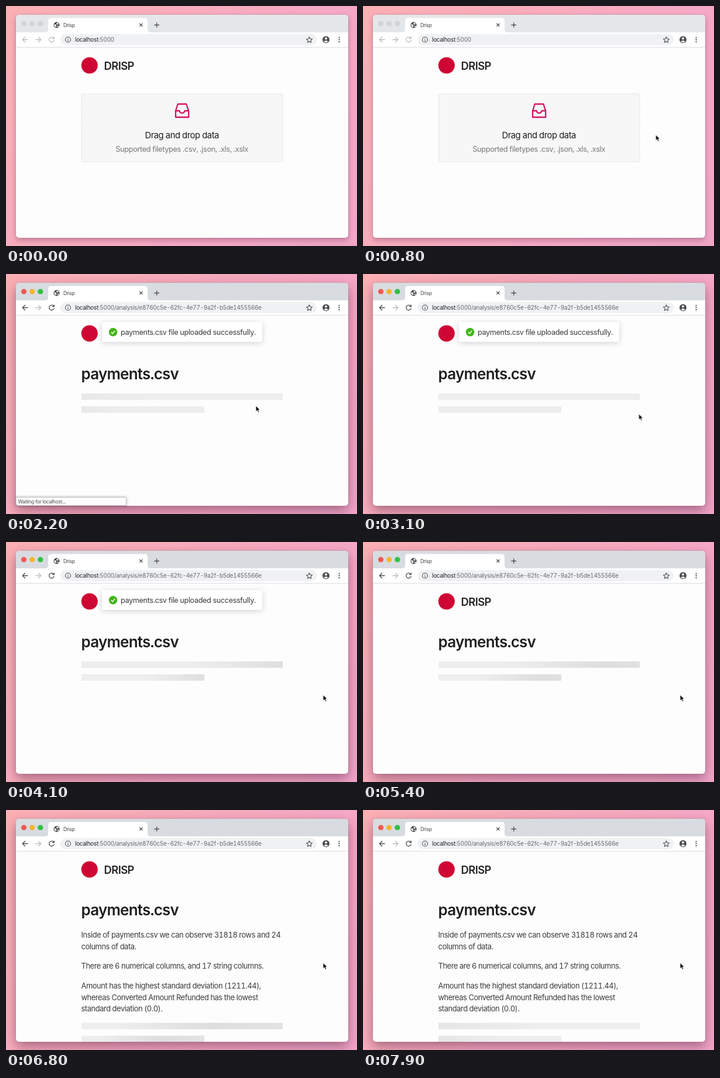
An HTML page for the animation above (8000 ms loop, 600x410 px).

```html
<!DOCTYPE html>
<html lang="en">
<head>
<meta charset="utf-8">
<title>Upload demo</title>
<style>
  html, body { margin: 0; width: 100%; height: 100%; overflow: hidden; }
  body { position: relative; background: linear-gradient(125deg, #fbb0b4, #f6a9c3 60%, #f1a6c8); }
  svg { position: absolute; left: 0; top: 0; width: 600px; height: 410px; display: block; }
  text { font-family: Inter, "Open Sans", sans-serif; font-variant-numeric: tabular-nums; letter-spacing: -.03em; fill: #3a3b3f; }

  .frame { position: absolute; left: 17px; top: 15px; width: 568px; height: 380.5px; border-radius: 5px; background: #fefdfe; }
  .soft { box-shadow: 0 4px 10px rgba(70, 20, 50, .3), 0 0 1px rgba(0, 0, 0, .45); }
  .deep { box-shadow: 0 8px 20px rgba(70, 20, 50, .45), 0 0 1px rgba(0, 0, 0, .5); }

  .line { fill: none; stroke-width: 1.3; stroke-linecap: round; stroke-linejoin: round; }
  .dark { stroke: #4b4e52; }
  .pale { stroke: #b9bcc0; }
  .url { font-size: 9.9px; letter-spacing: -.025em; fill: #66696e; }
  .host { fill: #202124; }
  .tab { font-size: 8.4px; fill: #3a3d41; }
  .brand { font-size: 18.4px; font-weight: 600; fill: #232326; }
  .lead { font-size: 14.8px; fill: #1c1c1e; text-anchor: middle; }
  .hint { font-size: 12.8px; fill: #77777a; text-anchor: middle; }
  .body { font-size: 12.9px; letter-spacing: -.034em; }
  .note { font-size: 12.7px; }
  .title { font-size: 26px; font-weight: 600; fill: #1f1f22; }
  .status { font-size: 8.4px; fill: #4c4c4e; }

  /* one 8 s timeline, 1% = 80 ms */
  .idle, .active, .home, .queue, .report, .wait, .facts, .bars {
    animation: 8s step-end infinite;
  }
  .idle { animation-name: idle; }
  .active { animation-name: active; }
  .home { animation-name: home; }
  .queue { animation-name: queue; }
  .report { animation-name: report; }
  .wait { animation-name: wait; }
  .facts { animation-name: facts; }
  .bars { animation-name: bars; }
  @keyframes idle { 0% { visibility: visible } 14.375%, 100% { visibility: hidden } }
  @keyframes active { 0% { visibility: hidden } 14.375%, 100% { visibility: visible } }
  @keyframes home { 0% { visibility: visible } 24.125%, 100% { visibility: hidden } }
  @keyframes queue { 0% { visibility: hidden } 15% { visibility: visible } 24.125%, 100% { visibility: hidden } }
  @keyframes report { 0% { visibility: hidden } 24.125%, 100% { visibility: visible } }
  @keyframes wait { 0% { visibility: hidden } 25% { visibility: visible } 31.25%, 100% { visibility: hidden } }
  @keyframes facts { 0% { visibility: hidden } 77.5%, 100% { visibility: visible } }
  @keyframes bars { 0% { transform: none } 77.5%, 100% { transform: translateY(159.5px) } }

  .spin { transform-origin: 138px 284px; animation: spin 1s linear infinite; }
  @keyframes spin { from { transform: rotate(-90deg) } to { transform: rotate(270deg) } }

  .fill { transform-origin: 151px 295px; animation: fill 8s linear infinite; }
  @keyframes fill {
    0%, 15% { transform: scaleX(0) }
    18.75% { transform: scaleX(.43) }
    23.5%, 100% { transform: scaleX(1) }
  }

  .toast { filter: drop-shadow(0 2px 5px rgba(0, 0, 0, .17)); animation: toast 8s ease-out infinite; }
  @keyframes toast {
    0%, 24.5% { opacity: 0; transform: translateY(-34px) }
    27%, 62% { opacity: 1; transform: none }
    65%, 100% { opacity: 0; transform: translateY(-34px) }
  }

  .page { position: absolute; left: 17px; top: 71px; width: 568px; height: 324.5px; overflow: hidden; border-radius: 0 0 5px 5px; }
  .bar {
    position: absolute; left: 112px; height: 11px;
    background: linear-gradient(90deg, #eee 25%, #dedede 37%, #eee 63%) 100% 50% / 400% 100%;
    animation: shimmer 8s ease infinite;
  }
  .long { top: 132.5px; width: 344px; }
  .short { top: 155px; width: 210px; }
  /* 1.4 s sweeps, restarted when the text arrives; the last one is cut by the loop */
  @keyframes shimmer {
    0%, 24.125% { background-position: 100% 50% }
    41.62%, 59.12%, 76.62%, 94.995% { background-position: 0 50% }
    41.625%, 59.125%, 76.625%, 77.5% { background-position: 100% 50% }
    95% { background-position: 100% 50%; animation-timing-function: cubic-bezier(.405, .096, .623, .545) }
    100% { background-position: 51.5% 50% }
  }

  .pointer { animation: move 8s ease-in-out infinite, enter 8s step-end infinite; }
  @keyframes move {
    0%, 6.25% { transform: translate(584px, 214px) }
    13.5%, 34% { transform: translate(427px, 225px) }
    45%, 100% { transform: translate(542px, 261px) }
  }
  @keyframes enter { 0% { visibility: hidden } 6.25%, 100% { visibility: visible } }
</style>
</head>
<body>
<div class="frame soft idle"></div>
<div class="frame deep active"></div>

<svg viewBox="0 0 600 410">
  <defs>
    <path id="strip" d="M17 45V20a5 5 0 0 1 5-5H580a5 5 0 0 1 5 5V45z"/>
    <path id="back" d="M37 57.5H28.5M32.5 53.3L28.3 57.5L32.5 61.7"/>
    <path id="reload" d="M81.6 55A4.3 4.3 0 1 0 82.2 58.6M82.3 52.8V55.7H79.3"/>
  </defs>

  <!-- tab strip -->
  <g class="idle">
    <use href="#strip" fill="#e4e7ea"/>
    <g fill="#d2d4d7"><circle cx="30.5" cy="30" r="4.6"/><circle cx="44.7" cy="30" r="4.6"/><circle cx="58.8" cy="30" r="4.6"/></g>
  </g>
  <g class="active">
    <use href="#strip" fill="#d8dce1"/>
    <circle cx="30.5" cy="30" r="4.6" fill="#f25a52"/>
    <circle cx="44.7" cy="30" r="4.6" fill="#f6b62e"/>
    <circle cx="58.8" cy="30" r="4.6" fill="#33c046"/>
  </g>
  <path d="M67 45q5 0 5-5V25.5q0-5 5-5H237q5 0 5 5V40q0 5 5 5z" fill="#fff"/>
  <circle cx="86.5" cy="32.5" r="5" fill="#3f4246"/>
  <path d="M83 30.5l2.5 1.5 1 2-1.5 2.5-2.6-3zM87 28.5l3.2 1.6-1.700 2-2.5-1zM88.5 33.5l2 .3-1.5 2.5-1.5-1z" fill="#fff"/>
  <text class="tab" x="98" y="35.5">Drisp</text>
  <path class="line dark" d="M228.7 30.2l4.4 4.400m0-4.400l-4.400 4.400M257.700 28.700v7.600M253.900 32.500h7.600"/>

  <!-- toolbar -->
  <rect x="17" y="45" width="568" height="25.5" fill="#fff"/>
  <path d="M17 70.5H585" stroke="#dcdde0"/>
  <g class="line">
    <g class="idle pale"><use href="#back"/><use href="#reload"/></g>
    <g class="active dark"><use href="#back"/><use href="#reload"/></g>
    <path class="pale" d="M51 57.5H59.5M55.5 53.3L59.7 57.5L55.5 61.7"/>
  </g>
  <rect x="93" y="48" width="438" height="19" rx="9.5" fill="#eff1f3"/>
  <g class="line dark" style="stroke-width:1.1">
    <circle cx="106" cy="57.5" r="4.5"/>
    <path d="M106 57.3v2.4M106 55.2v.1"/>
    <path d="M518.5 52.8l1.5 3.2 3.5.4-2.6 2.4.7 3.5-3.1-1.8-3.1 1.8.7-3.5-2.6-2.4 3.5-.4z"/>
  </g>
  <text class="url home" x="118" y="61"><tspan class="host">localhost</tspan>:5000</text>
  <text class="url report" x="118" y="61"><tspan class="host">localhost</tspan>:5000/analysis/e8760c5e-62fc-4e77-9a2f-b5de1455566e</text>
  <circle cx="547" cy="57.5" r="6" fill="#4b4e52"/>
  <circle cx="547" cy="55.5" r="1.9" fill="#fff"/>
  <path d="M543.3 60.8q3.7-3.4 7.4 0q-3.7 3.6-7.4 0z" fill="#fff"/>
  <g fill="#4b4e52"><circle cx="569.5" cy="53.8" r="1.15"/><circle cx="569.5" cy="57.5" r="1.15"/><circle cx="569.5" cy="61.2" r="1.15"/></g>

  <!-- header -->
  <circle cx="142.8" cy="101.5" r="14" fill="#cf0634"/>
  <text class="brand" x="167.5" y="108.5">DRISP</text>

  <!-- upload page -->
  <g class="home">
    <rect x="129.5" y="150" width="343.5" height="116" rx="2" fill="#f7f7f8" stroke="#d6d6d8" stroke-dasharray="2.5 2"/>
    <path d="M290 179L293.7 167.5H308.3L312.2 179V190H290ZM290 179H296.5C297 181.5 298.5 182.8 301 182.8S305 181.5 305.6 179H312" fill="none" stroke="#d0145c" stroke-width="2.3" stroke-linejoin="round"/>
    <text class="lead" x="300.7" y="226">Drag and drop data</text>
    <text class="hint" x="300.7" y="249">Supported filetypes .csv, .json, .xls, .xslx</text>
  </g>
  <g class="queue">
    <path class="spin" d="M138 277.8A6.2 6.2 0 0 1 144.2 284" fill="none" stroke="#77787b" stroke-width="1.1" stroke-linecap="round"/>
    <text class="note" x="151" y="287">payments.csv</text>
    <path d="M151 295H473" stroke="#ececee" stroke-width="1.6"/>
    <path class="fill" d="M151 295H473" stroke="#2f76d6" stroke-width="1.6"/>
  </g>

  <!-- report page -->
  <text class="title report" x="128.5" y="180">payments.csv</text>
  <g class="facts">
    <text class="body" x="128.5" y="218">Inside of payments.csv we can observe 31818 rows and 24</text>
    <text class="body" x="128.5" y="238">columns of data.</text>
    <text class="body" x="128.5" y="271">There are 6 numerical columns, and 17 string columns.</text>
    <text class="body" x="128.5" y="304.5">Amount has the highest standard deviation (1211.44),</text>
    <text class="body" x="128.5" y="324.5">whereas Converted Amount Refunded has the lowest</text>
    <text class="body" x="128.5" y="344">standard deviation (0.0).</text>
  </g>
  <g class="report">
    <g class="toast">
      <rect x="164" y="82" width="274" height="34" rx="2.5" fill="#fff"/>
      <circle cx="183" cy="99.3" r="7.2" fill="#43b517"/>
      <path d="M179.8 99.5l2.3 2.4 4-4.8" fill="none" stroke="#fff" stroke-width="1.5"/>
      <text class="note" x="196" y="104">payments.csv file uploaded successfully.</text>
    </g>
  </g>
  <g class="wait">
    <path d="M17 381.5H203q2.5 0 2.5 2.5V395.5H21q-4 0-4-4z" fill="#fff" stroke="#bfc0c3" style="filter:drop-shadow(0 0 2px rgba(0,0,0,.3))"/>
    <text class="status" x="20.5" y="391.5">Waiting for localhost...</text>
  </g>
</svg>

<div class="page report">
  <div class="bars"><div class="bar long"></div><div class="bar short"></div></div>
</div>

<svg viewBox="0 0 600 410">
  <path class="pointer" d="M0 0V10.2L2.4 8.1L4 11.8L5.9 11L4.3 7.4H7.4Z" fill="#111" stroke="#fff" stroke-width=".9" stroke-linejoin="round"/>
</svg>
</body>
</html>
```
